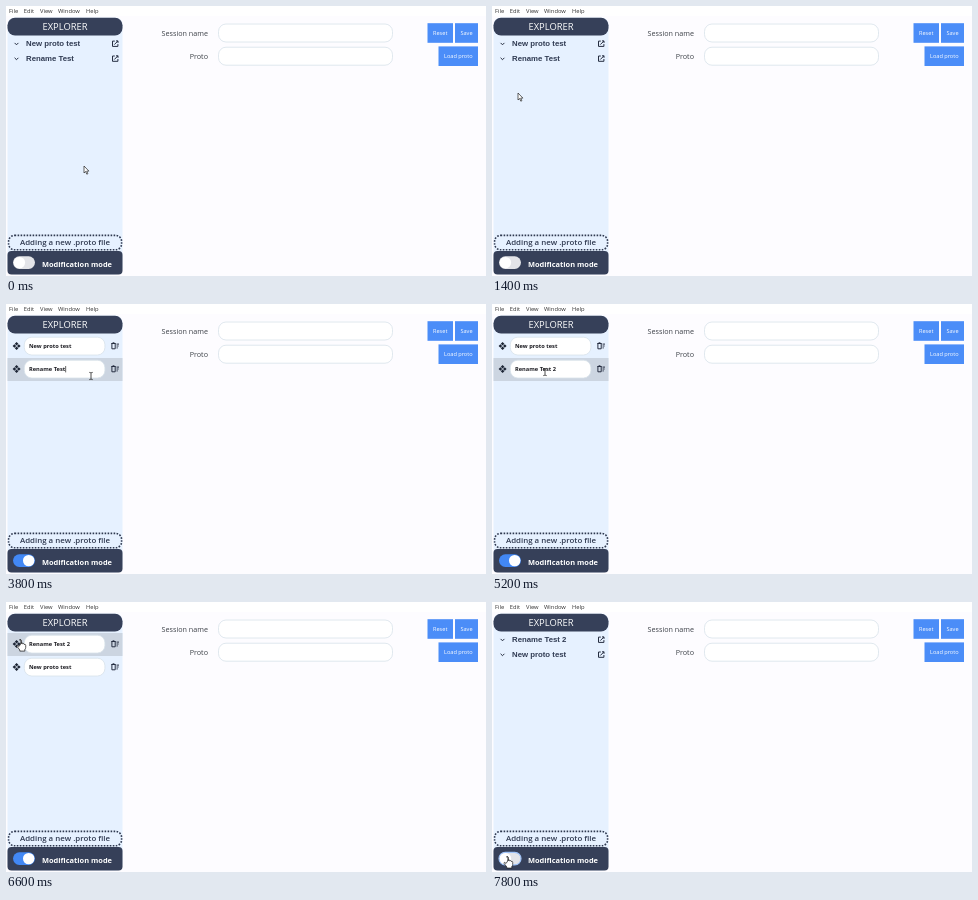
Animation of 480 by 270 pixels, one loop 8000 ms. Source, as an HTML page:

```html
<!DOCTYPE html>
<html lang="en">
<head>
<meta charset="utf-8">
<title>Explorer</title>
<style>
  html, body { margin: 0; width: 100%; height: 100%; overflow: hidden; background: #fdfcff; }
  svg { display: block; width: 480px; height: 270px; }
  text { font-family: "Open Sans", "Noto Sans", sans-serif; white-space: pre; }
  .menu { font-size: 5.8px; fill: #333; }
  .label { font-size: 7.2px; fill: #3d4148; text-anchor: end; }
  .button { font-size: 5.6px; fill: #fff; text-anchor: middle; }
  .field { fill: #fff; stroke: #d9e3ea; stroke-width: .8; }
  .tree { font: bold 7.8px "Liberation Sans", Arial, sans-serif; fill: #2f3a52; }
  .name { font-size: 5.7px; font-weight: 700; fill: #1c1c22; }
  .line { fill: none; stroke: #252d40; stroke-width: 1; }
</style>
</head>
<body>
<svg id="stage" viewBox="0 0 480 270">
  <defs>
    <g id="open" class="line">
      <path d="M-.4-2.6H-2.7V2.7H2.7V.4M.8-2.8H2.8V-.8M2.7-2.7L-.9 .9"/>
    </g>
    <path id="chevron" class="line" d="M-1.9-.9L0 1L1.9-.9"/>
    <path id="move" fill="#1d2535"
      d="M0-4L1.8-2.2L0-.4L-1.8-2.2ZM0 .4L1.8 2.2L0 4L-1.8 2.2ZM-4 0L-2.2-1.8L-.4 0L-2.2 1.8ZM.4 0L2.2-1.8L4 0L2.2 1.8Z"/>
    <g id="trash" class="line" stroke-width=".9">
      <path d="M-3.8-2.5H.8M-2.4-3.2H-.6M-3.1-2V2.8H.2V-2M1.5-1.9H4M1.5 0H3.6M1.5 1.9H2.8"/>
    </g>
    <path id="arrow" fill="#fff" stroke="#222" stroke-width=".7" stroke-linejoin="round"
      d="M0 0V7L1.6 5.5L2.8 8.2L3.9 7.7L2.7 5.1H4.9Z"/>
    <path id="hand" fill="#fff" stroke="#222" stroke-width=".75" stroke-linejoin="round"
      d="M-1 .7Q0-.6 1 .7V4.3Q2-.1 0 0M1 4V3.5Q2 2.8 2.7 3.7V4.4Q3.6 3.6 4.3 4.6V5Q5.6 4.5 5.7 5.8V8Q5.6 9.4 4.8 10V11.6H-.2V10.5L-2.9 7Q-3.2 5.8-2.2 5.9L-1 7Z"/>
    <path id="beam" fill="none" stroke="#222" stroke-width=".8"
      d="M-1.7-3.6Q0-3.6 0-2.8Q0-3.6 1.7-3.6M0-2.8V2.8M-1.7 3.6Q0 3.6 0 2.8Q0 3.6 1.7 3.6"/>
  </defs>

  <rect width="480" height="270" fill="#fdfcff"/>
  <rect width="480" height="10" fill="#fff"/>
  <g class="menu">
    <text x="3" y="6.8">File</text><text x="17.8" y="6.8">Edit</text>
    <text x="34" y="6.8">View</text><text x="52" y="6.8">Window</text>
    <text x="80" y="6.8">Help</text>
  </g>

  <rect x="1.5" y="11.5" width="115" height="257" rx="7" fill="#e6f1ff"/>
  <rect x="1.5" y="11.8" width="115" height="17.6" rx="7.5" fill="#364059"/>
  <text x="59" y="24.2" font-size="9.4" fill="#fff" text-anchor="middle">EXPLORER</text>
  <g id="list"></g>
  <rect x="2.6" y="229.4" width="113" height="14.4" rx="6" fill="none"
    stroke="#2f3950" stroke-width="1.6" stroke-dasharray="1.6 1.4"/>
  <text x="59" y="239.2" font-size="7.9" font-weight="600" fill="#2f3950" text-anchor="middle">Adding a new .proto file</text>
  <rect x="1.5" y="245" width="115" height="23.5" rx="4" fill="#364059"/>
  <rect id="track" x="7" y="250.3" width="22" height="12.6" rx="6.3"/>
  <circle id="knob" cy="256.6" r="5.7" fill="#fff"/>
  <text x="36" y="260.6" font-size="7.45" font-weight="700" fill="#fff">Modification mode</text>

  <text class="label" x="202" y="29.8">Session name</text>
  <text class="label" x="202" y="52.8">Proto</text>
  <rect class="field" x="212.5" y="18" width="174" height="18" rx="7.5"/>
  <rect class="field" x="212.5" y="41.2" width="174" height="18" rx="7.5"/>
  <g fill="#4b8df8">
    <rect x="421.5" y="17.2" width="25.5" height="19.6"/>
    <rect x="449" y="17.2" width="23" height="19.6"/>
    <rect x="432.5" y="40.4" width="39.5" height="19.6"/>
  </g>
  <g class="button">
    <text x="434.2" y="29.2">Reset</text><text x="460.5" y="29.2">Save</text>
    <text x="452.3" y="52.4">Load proto</text>
  </g>
  <use id="pointer"/>
</svg>
<script>
const LOOP = 8000, STEP = 200, ROW = 23, TOP = 31;
const $ = id => document.getElementById(id);
const set = (el, attrs) => { for (const k in attrs) el.setAttribute(k, attrs[k]); };
const show = (el, on) => { el.style.display = on ? "" : "none"; };

// time, x, y
const path = [
  [0, 78, 160], [400, 78, 160], [1000, 47, 116], [1400, 26, 87], [1600, 23, 108],
  [2000, 12, 251.5], [2400, 12, 251.5], [2800, 30, 205], [3200, 77, 88],
  [3400, 85, 72], [4600, 85, 72], [5200, 53, 68], [5800, 13, 61],
  [6000, 14, 60], [6400, 14, 37.5], [6600, 14, 37.5], [7000, 15, 242],
  [7200, 15, 254.5], [8000, 15, 254.5]
];
// time, value
const knobSteps = [[0, 0], [2200, 0], [2400, 1], [7600, 1], [7800, 0], [8000, 0]];
const dragSteps = [[0, 0], [6000, 0], [6400, 1], [8000, 1]];

function at(steps, t, col = 1) {
  const i = Math.max(1, steps.findIndex(s => s[0] > t));
  const a = steps[i - 1], b = steps[i];
  return a[col] + (b[col] - a[col]) * (t - a[0]) / (b[0] - a[0]);
}

function makeItem(label) {
  const g = document.createElementNS("http://www.w3.org/2000/svg", "g");
  g.innerHTML = `<g>
      <use href="#chevron" x="10.5" y="37.8"/><text class="tree" x="20" y="40.2"></text>
      <use href="#open" x="109.2" y="37.7"/>
    </g>
    <g>
      <rect x="1.5" y="31" width="115" height="23" fill="#ccd5e1"/>
      <use href="#move" x="10.6" y="42"/>
      <rect class="field" x="18.3" y="33.2" width="80.6" height="17.8" rx="7.5"/>
      <text class="name" x="23" y="44.1"></text>
      <path stroke="#222" stroke-width=".7"/>
      <use href="#trash" x="109" y="42"/>
    </g>`;
  $("list").append(g);
  const [tree, edit] = g.children;
  return {
    label, g, tree, edit, title: tree.querySelector("text"), bg: edit.querySelector("rect"),
    name: edit.querySelector("text"), caret: edit.querySelector("path")
  };
}
const items = ["New proto test", "Rename Test"].map(makeItem);

function pointerKind(x, y, edit) {
  if (y > 249 && x < 30) return "hand";
  const inRows = edit && y >= TOP && y < TOP + 2 * ROW;
  if (inRows && x < 17) return "hand";
  return inRows && x < 99 ? "beam" : "arrow";
}

function draw(t) {
  const x = at(path, t), y = at(path, t, 2);
  const edit = t >= 2200 && t < 7600;
  const drag = at(dragSteps, t);
  const hover = edit && y >= TOP && y < TOP + 2 * ROW ? Math.floor((y - TOP) / ROW) : -1;
  const dragging = drag > 0 && drag < 1;
  const typed = " 2".slice(0, t < 4000 ? 0 : t < 4200 ? 1 : 2);
  const caretOn = (t >= 3400 && t < 4800) || (t >= 5400 && t < 6000);

  items.forEach((it, i) => {
    const slot = i ? 1 - drag : drag;
    const text = it.label + (i ? typed : "");
    it.title.textContent = it.name.textContent = text;
    show(it.tree, !edit);
    show(it.edit, edit);
    set(it.g, { transform: `translate(0 ${slot * (edit ? ROW : 14.9)})` });
    show(it.bg, dragging ? i === 1 : hover === Math.round(slot));
    show(it.caret, i === 1 && caretOn);
    if (i && caretOn) {
      const end = 23.4 + it.name.getComputedTextLength();
      set(it.caret, { d: `M${end} 39V45.4` });
    }
  });

  const k = at(knobSteps, t);
  const ring = (t >= 2200 && t < 3400) || t >= 7600;
  set($("track"), {
    fill: k > .5 ? "#4288f5" : "#e3e4e8",
    stroke: ring ? "#9fc3f8" : "none", "stroke-width": 1.2
  });
  set($("knob"), { cx: 13.4 + 9.3 * k });
  set($("pointer"), { href: "#" + pointerKind(x, y, edit), x, y });
}

const start = performance.now();
function tick(now) {
  const t = Math.max(0, now - start) % LOOP;
  draw(Math.floor(t / STEP) * STEP);
  requestAnimationFrame(tick);
}
draw(0);
requestAnimationFrame(tick);
</script>
</body>
</html>
```
